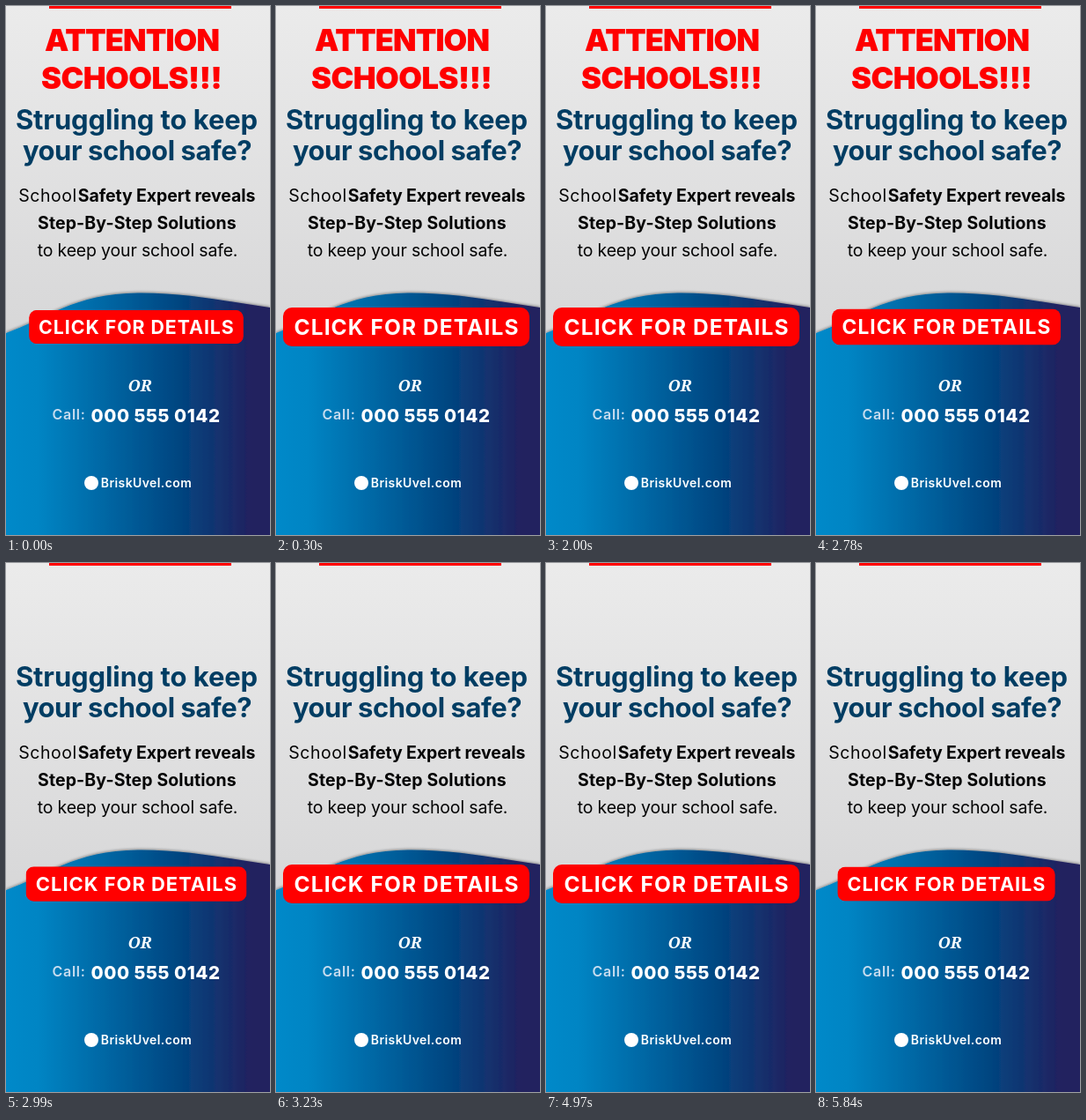
An HTML page that plays this animation: 300 px wide and 600 px high, repeating every 5.87 s.

```html
<!DOCTYPE html>
<html lang="en">
<head>
<meta charset="utf-8">
<title>School safety banner</title>
<style>
  html, body { margin: 0; width: 100%; height: 100%; overflow: hidden; }
  svg { display: block; width: 300px; height: 600px; }
  text { font-family: Inter, "Open Sans", sans-serif; text-anchor: middle; }

  .alert { fill: #f00; font-size: 34.5px; font-weight: 900; animation: blink 5870ms step-end infinite; }
  .question { fill: #003d63; font-size: 31px; font-weight: 700; }
  .pitch { fill: #050505; font-size: 19.5px; }
  .strong { font-weight: 700; }
  .button { transform-origin: 148px 364px; animation: pulse 5870ms infinite; }
  .button text { font-size: 24.5px; font-weight: 700; letter-spacing: 1.1px; }
  .contact { fill: #fff; }
  .or { font: italic 700 18px "Noto Serif", serif; }

  @keyframes blink {
    0%, 34.0716%, 66.9506% { visibility: visible; }
    17.0358%, 50.937%, 84.6678%, 100% { visibility: hidden; }
  }
  /* The button shrinks and grows in 30 ms steps. */
  @keyframes pulse {
    0% { transform: scale(.87); animation-timing-function: steps(10); }
    5.1107% { transform: scale(1); }
    44.293% { transform: scale(1); animation-timing-function: steps(11); }
    49.9148% { transform: scale(.87); animation-timing-function: steps(10); }
    55.0256% { transform: scale(1); }
    94.8893% { transform: scale(1); animation-timing-function: steps(10); }
    100% { transform: scale(.87); }
  }
</style>
</head>
<body>
<svg viewBox="0 0 300 600">
  <defs>
    <linearGradient id="paper" x2="0" y2="1">
      <stop stop-color="#ebebeb"/>
      <stop offset="1" stop-color="#d7d7d8"/>
    </linearGradient>
    <linearGradient id="sea">
      <stop stop-color="#0089c9"/>
      <stop offset=".12" stop-color="#0085c4"/>
      <stop offset=".65" stop-color="#014681"/>
      <stop offset=".93" stop-color="#22215f"/>
      <stop offset="1" stop-color="#24205e"/>
    </linearGradient>
    <filter id="shade" x="-5%" y="-5%" width="110%" height="110%">
      <feDropShadow dx="0" dy="-1" stdDeviation="1.5" flood-color="#000" flood-opacity=".4"/>
    </filter>
  </defs>

  <rect width="300" height="374" fill="url(#paper)"/>
  <rect x="49" width="207" height="3" fill="#f00"/>
  <path d="M0 371C45 355 78 326 150 325.500C205 325 250 335 300 342V600H0Z" fill="url(#sea)" filter="url(#shade)"/>

  <g class="alert">
    <text x="143" y="51" letter-spacing="-.9">ATTENTION</text>
    <text x="142.500" y="93.500" letter-spacing="-.5">SCHOOLS!!!</text>
  </g>

  <g class="question">
    <text x="148.500" y="140" letter-spacing="-.1">Struggling to keep</text>
    <text x="149" y="175" letter-spacing="-.45">your school safe?</text>
  </g>

  <g class="pitch">
    <text x="47.500" y="222" letter-spacing=".5">School</text>
    <text class="strong" x="182.500" y="222" letter-spacing="-.1">Safety Expert reveals</text>
    <text class="strong" x="149" y="253" letter-spacing=".1">Step-By-Step Solutions</text>
    <text x="149.500" y="284" letter-spacing="-.17">to keep your school safe.</text>
  </g>

  <g class="button">
    <rect x="8" y="342" width="280" height="44" rx="10" fill="#f00"/>
    <text x="148.500" y="373" fill="#fff">CLICK FOR DETAILS</text>
  </g>

  <g class="contact">
    <text class="or" x="152" y="437">OR</text>
    <text x="71.500" y="469" font-size="16" font-weight="600" letter-spacing=".7" fill="#c9ddef">Call:</text>
    <text x="170" y="472" font-size="20.500" font-weight="800" letter-spacing=".5">000 555 0142</text>
    <circle cx="97" cy="541" r="8"/>
    <text x="159.500" y="546" font-size="14" font-weight="600" letter-spacing=".4">BriskUvel.com</text>
  </g>
</svg>
</body>
</html>
```
